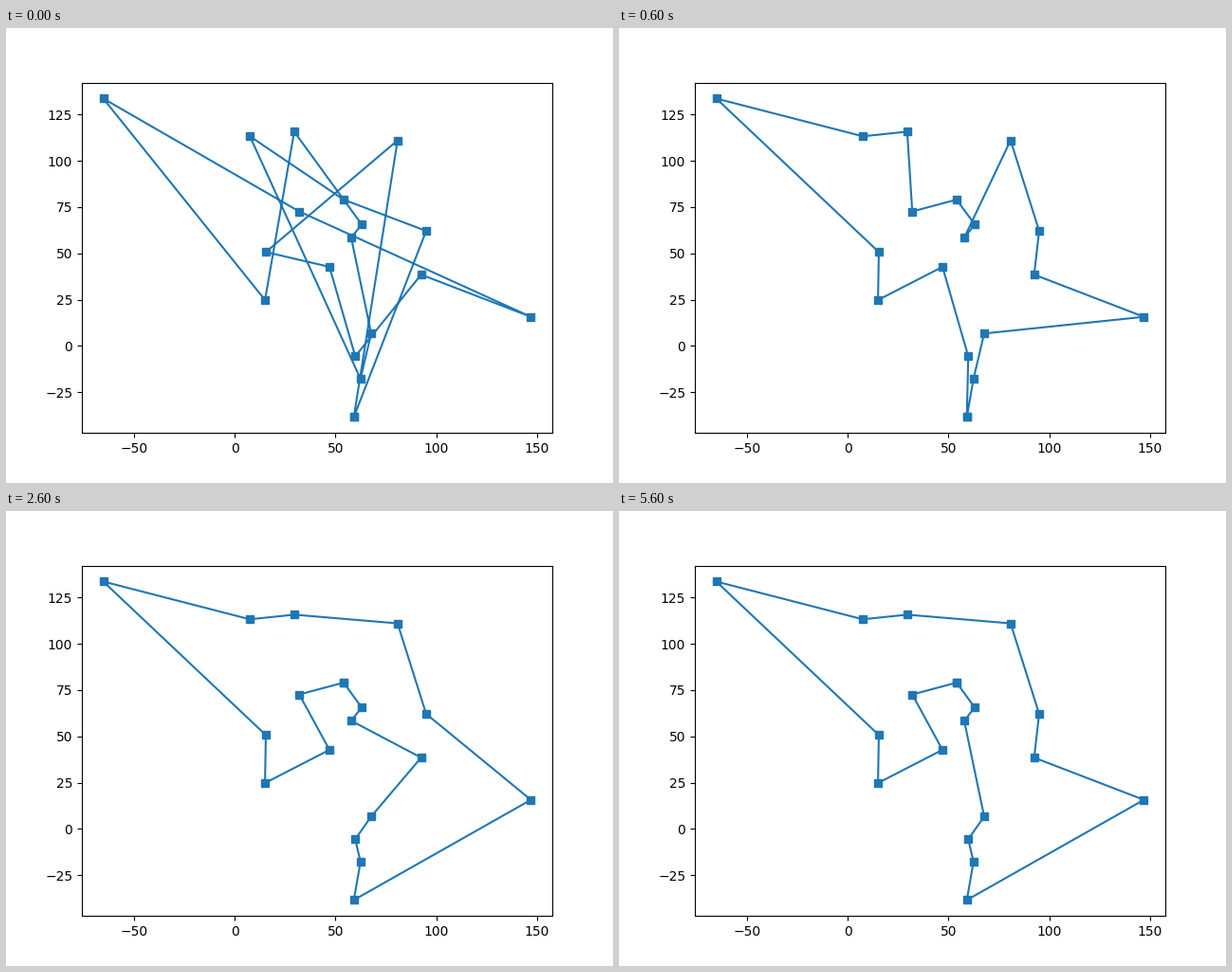
Animation, 640 px wide and 480 px high, one loop 10 s. Source, as a matplotlib script:

```python
import matplotlib.pyplot as plt
from matplotlib.animation import FuncAnimation

STEP = 200   # ms per generation
STEPS = 50   # generations in one loop

CITIES = {
    "A": (-65.3, 133.6), "B": (7.5, 113.2), "C": (29.5, 115.7),
    "D": (80.8, 111.0), "E": (32.0, 72.6), "F": (54.0, 79.0),
    "G": (63.0, 65.6), "H": (57.8, 58.4), "I": (95.0, 62.1),
    "J": (92.5, 38.5), "K": (147.0, 15.7), "L": (15.4, 50.7),
    "M": (15.0, 24.8), "N": (47.0, 42.7), "O": (59.8, -5.6),
    "P": (67.7, 6.7), "Q": (62.4, -17.8), "R": (59.1, -38.4),
}

# Best tour found, keyed by the generation in which it appears
TOURS = {
    0: "RIFBQPHGCMAEKJONLD",
    1: "RQPJKIHGFDCEABLMNO",
    2: "RQPKJIHGFDECABLMNO",
    3: "RQPKJIDHGFECBALMNO",
    4: "OQRMLABCEFDIKJGHNP",
    12: "JEFGHOQRKIDCBALMNP",
    13: "FGHJPOQRKIDCBALMNE",
    15: "GHNJPOQRKIDCBAMLEF",
    16: "FGHJPOQRKIDCBALMNE",
    28: "FGHPOQRKJIDCBALMNE",
}


def tour_at(step):
    return TOURS[max(start for start in TOURS if start <= step)]


def coords(tour):
    closed = tour + tour[0]
    return zip(*(CITIES[name] for name in closed))


fig, ax = plt.subplots(figsize=(6.4, 4.8), dpi=100)
line, = ax.plot(*coords(tour_at(0)), "s-")


def update(step):
    line.set_data(*coords(tour_at(step)))
    return line,


anim = FuncAnimation(fig, update, frames=STEPS, interval=STEP,
                     repeat=True, repeat_delay=0)
plt.show()
```
